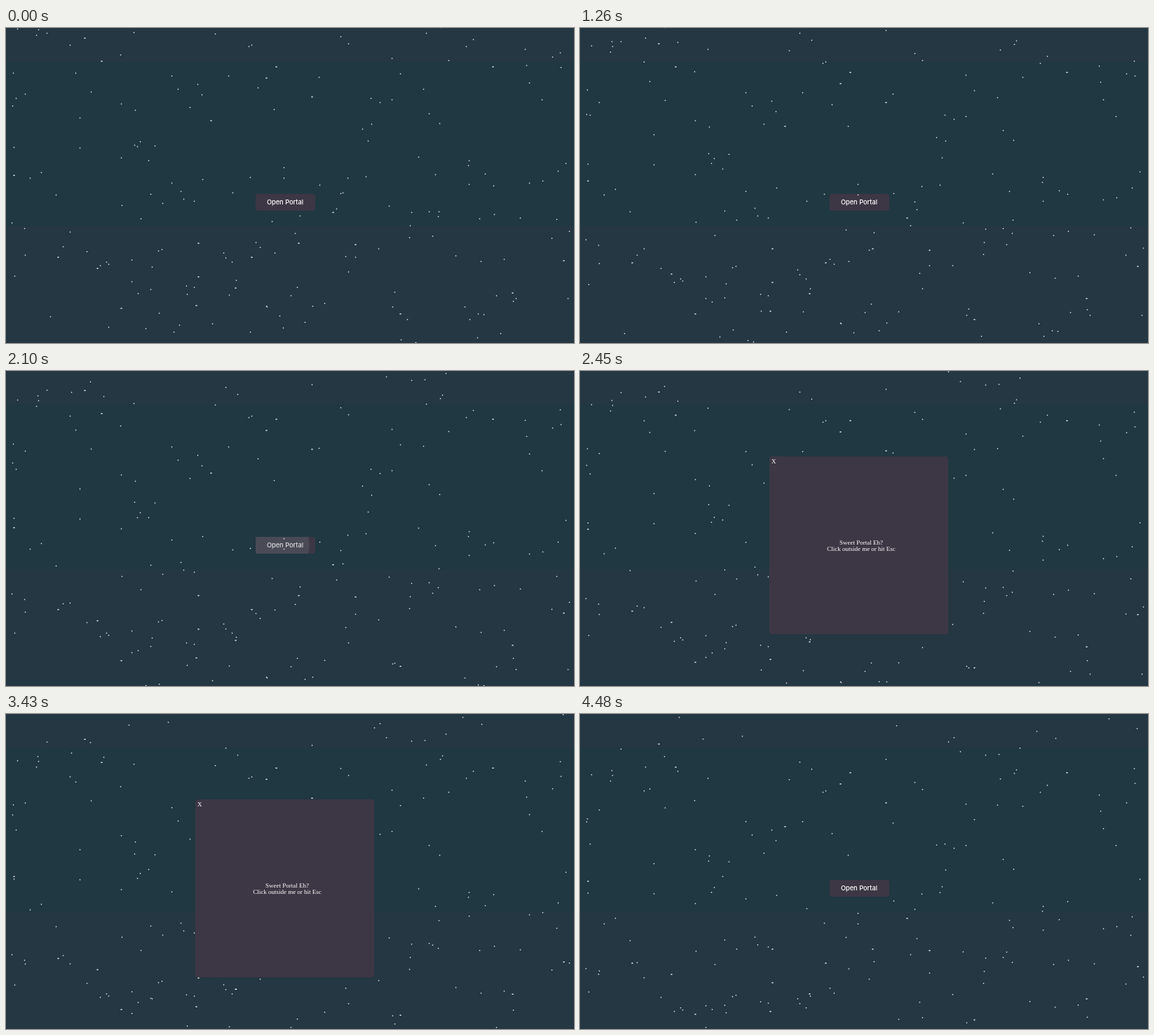
Animation, 810 px wide and 450 px high, one loop 4.55 s. Source, as an HTML page with a canvas:

```html
<!DOCTYPE html>
<html lang="en">
<head>
<meta charset="utf-8">
<title>Open Portal</title>
<style>
  html, body { margin: 0; width: 100%; height: 100%; overflow: hidden; background: #243742; }
  canvas { display: block; width: 810px; height: 450px; }
</style>
</head>
<body>
<canvas id="stage" width="810" height="450"></canvas>
<script>
const ctx = document.getElementById('stage').getContext('2d');
const LOOP = 4550, STEP = 70;
const OPEN = 2310, CLOSE = 4130;
const SURFACE = '#3d3745';

// The brightest stars, at the start of the loop
const bright = [
  [112, 14], [136, 47], [385, 55], [694, 55], [371, 71], [292, 132], [436, 98], [11, 210],
  [466, 263], [417, 307], [498, 309], [795, 332], [74, 327], [130, 343], [274, 307], [350, 327],
  [274, 355], [271, 396], [327, 371], [562, 408], [722, 378], [164, 400]
];

// Seeded stars, kept off the path that leads across the button
function scatter(count, top, seed) {
  const rand = () => (seed = (seed * 16807) % 2147483647) / 2147483647;
  const stars = [];
  while (stars.length < count) {
    const x = Math.floor(rand() * 810);
    const y = Math.floor(top + rand() * (450 - top));
    if (x < 350 || x > 446 || y < 150 || y > 264) stars.push([x, y]);
  }
  return stars;
}

const layers = [
  { stars: bright, speed: 6.35, w: 2.2, h: 1.4 },
  { stars: scatter(42, 0, 9161), speed: 9.52, w: 1.4, h: 1.4 },
  { stars: [[396, 199], [396, 214], ...scatter(156, -85, 4217)], speed: 19.04, w: 1.4, h: 1.4 }
];

function drawSky() {
  ctx.fillStyle = '#243742';
  ctx.fillRect(0, 0, 810, 450);
  ctx.fillStyle = '#203842';
  ctx.fillRect(0, 48, 810, 235);
}

function drawStars(t) {
  ctx.fillStyle = '#eef6f6';
  for (const { stars, speed, w, h } of layers) {
    const drop = speed * t / 1000;
    for (const [x, y] of stars) {
      ctx.fillRect(x + 0.5 - w / 2, y + drop + 0.5 - h / 2, w, h);
    }
  }
}

function box(x, y, w, h) {
  ctx.fillStyle = SURFACE;
  ctx.beginPath();
  ctx.roundRect(x, y, w, h, 4);
  ctx.fill();
}

function label(text, x, y, font) {
  ctx.font = font;
  ctx.textAlign = 'center';
  ctx.fillStyle = '#fff';
  ctx.fillText(text, x, y);
}

function ripple(t, start, cx, cy, reach, x, y, w, h) {
  const p = (t - start) / 600;
  if (p <= 0 || p >= 1) return;
  ctx.save();
  ctx.beginPath();
  ctx.rect(x, y, w, h);
  ctx.clip();
  ctx.fillStyle = `rgba(108, 125, 132, ${0.375 * (1 - p)})`;
  ctx.beginPath();
  ctx.arc(cx, cy, reach * p, 0, Math.PI * 2);
  ctx.fill();
  ctx.restore();
}

function drawButton(t) {
  box(356, 237, 85, 24);
  label('Open Portal', 398, 252, '500 9.25px Inter, sans-serif');
  ripple(t, 1930, 385, 249, 168, 356, 237, 85, 24);
}

function drawPanel(t) {
  const serif = '9px "Liberation Serif", Times, serif';
  box(270, 122, 255, 254);
  label('X', 276.3, 131.5, serif);
  label('Sweet Portal Eh?', 401, 247.5, serif);
  label('Click outside me or hit Esc', 401, 256.5, serif);
  ripple(t, 3800, 274, 128, 525, 270, 122, 255, 254);
}

function draw(now) {
  const t = Math.floor((now % LOOP) / STEP) * STEP;
  drawSky();
  drawButton(t);
  drawStars(t);
  if (t >= OPEN && t < CLOSE) drawPanel(t);
}

const begin = performance.now();
function tick() {
  draw(performance.now() - begin);
  requestAnimationFrame(tick);
}
tick();
</script>
</body>
</html>
```
